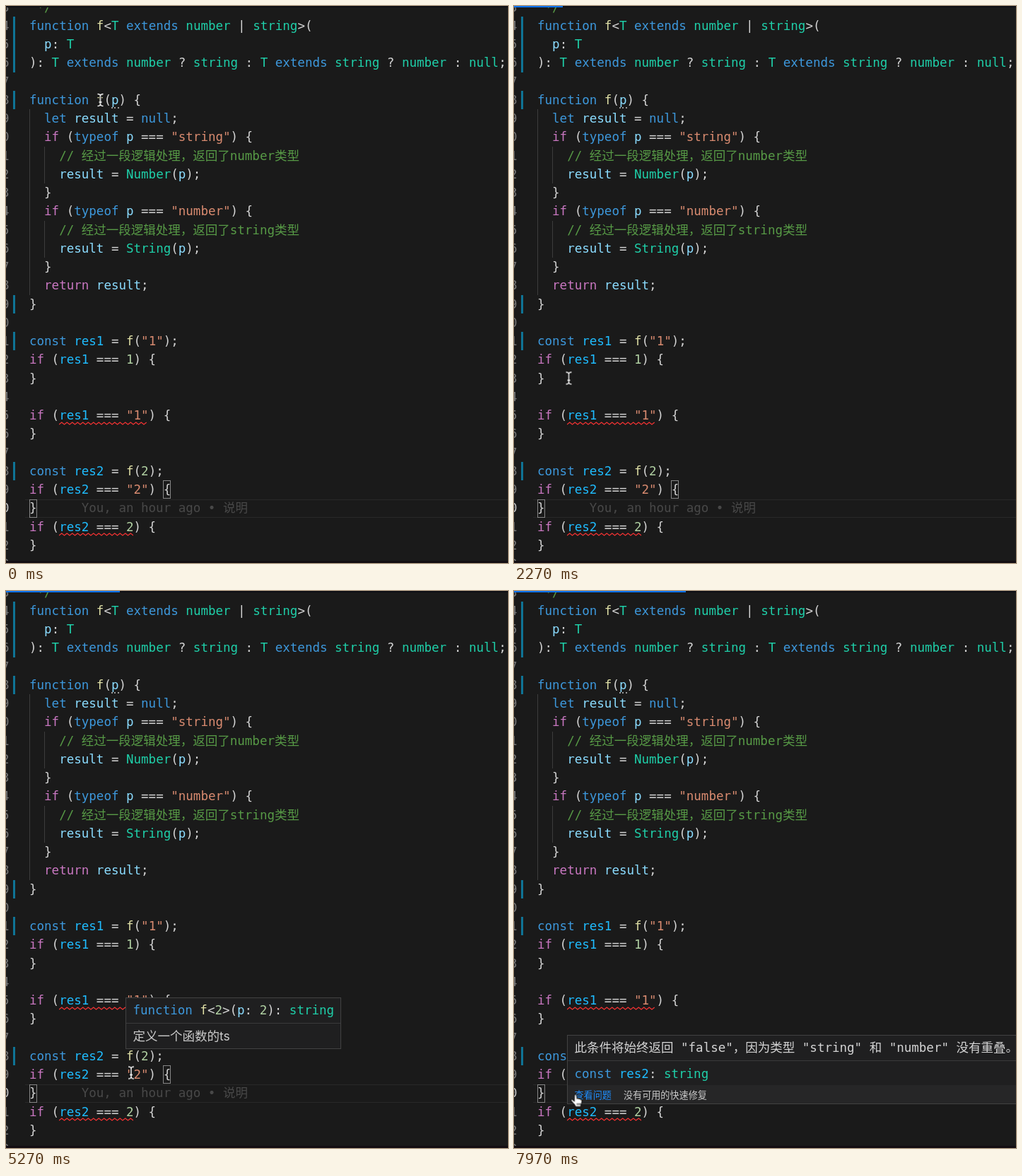
Write an HTML page that moves like this. It is 710x788 px and loops after 8 s.

```html
<!DOCTYPE html>
<html lang="zh-CN">
<head>
<meta charset="utf-8">
<title>Code editor</title>
<style>
  html, body { margin: 0; width: 100%; height: 100%; overflow: hidden; background: #1a1a1a; }
  #stage {
    position: absolute; left: 0; top: 0; width: 710px; height: 788px; overflow: hidden;
    color: #d4d4d4; background: #1a1a1a;
    font: 17.5px/26.25px "DejaVu Sans Mono", "Noto Sans CJK SC", monospace;
    font-variant-ligatures: none;
  }
  #stage div, #stage svg { position: absolute; box-sizing: border-box; }
  .row { white-space: pre; height: 26.25px; }
  .digit { color: #777; }
  .digit.active { color: #c6c6c6; }
  .changed { left: 10px; width: 3px; background: #0f7496; }
  .guide { width: 1px; background: #3c3c3c; }
  .current { left: 27px; right: 0; top: 698px; height: 26px; border: solid #282828; border-width: 1px 0; }
  .blame { color: #484848; }
  .bracket { width: 11px; height: 26px; border: 1px solid #868686; }
  .dots { left: 149px; top: 143px; width: 11px; height: 2px;
    background: repeating-linear-gradient(90deg, #999 0 2px, transparent 2px 4.4px); }

  .comment { color: #579a46; }
  .string { color: #d98b70; }
  .keyword { color: #3d98dc; }
  .control { color: #c977c1; }
  .constant { color: #1fbcff; }
  .type { color: #1fcfa9; }
  .call { color: #dfdfa6; }
  .variable { color: #8bdcff; }
  .number { color: #b1d1a3; }

  .tip { background: #1f1f20; border: 1px solid #424242; opacity: 0; }
  .rule { left: 0; right: 0; height: 1px; background: #3a3a3b; }
  .doc { font-family: Inter, "Noto Sans CJK SC", sans-serif; color: #cacaca; }
  .status { left: 0; right: 0; top: 70px; bottom: 0; background: #262627; }
  .small { font: 13.1px/26.25px "Noto Sans CJK SC", sans-serif; color: #cacaca; }
  .link { color: #1f8fff; }

  .top, .progress { left: 0; top: 0; height: 2px; }
  .top { width: 710px; background: #0d0e14; }
  .progress { background: #0b70ea; animation: grow 8s linear infinite; }
  .bottom { left: 0; bottom: 0; width: 710px; height: 3px; background: #130d12; }
  .caret { left: 43px; top: 699px; width: 2px; height: 25px; background: #b4b4b4;
    animation: blink 1s step-end infinite; }
  #mouse { left: 0; top: 0; animation: travel 8s ease-in-out infinite; }
  #mouse svg { left: -14px; top: -14px; }
  .beam { animation: beam 8s step-end infinite; }
  .hand { animation: hand 8s step-end infinite; }
  #tip1 { left: 128px; top: 23px; width: 600px; height: 100px; animation: tip1 8s linear infinite; }
  #tip2 { left: 169px; top: 575px; width: 305px; height: 73px; animation: tip2 8s linear infinite; }
  #tip3 { left: 75px; top: 628px; width: 660px; height: 98px; animation: tip3 8s linear infinite; }

  @keyframes grow { from { width: 0; } to { width: 244px; } }
  @keyframes blink { 0%, 82% { opacity: 0; } 32% { opacity: 1; } }
  @keyframes tip1 { 0%, 10.2% { opacity: 0; } 11.3%, 18% { opacity: 1; } 18.01%, 100% { opacity: 0; } }
  @keyframes tip2 { 0%, 53.5% { opacity: 0; } 54.7%, 67.2% { opacity: 1; } 67.21%, 100% { opacity: 0; } }
  @keyframes tip3 { 0%, 77.2% { opacity: 0; } 78.4%, 100% { opacity: 1; } }
  @keyframes beam { 0% { opacity: 1; } 90.5%, 100% { opacity: 0; } }
  @keyframes hand { 0% { opacity: 0; } 90.5%, 100% { opacity: 1; } }
  @keyframes travel {
    0%, 16.5% { transform: translate(133.5px, 133px); }
    26%, 31% { transform: translate(77.5px, 526.5px); }
    41%, 45% { transform: translate(159.5px, 656px); }
    48.5%, 61% { transform: translate(175px, 659px); }
    65.9% { transform: translate(177px, 681.5px); }
    73%, 86% { transform: translate(106.5px, 735px); }
    93%, 100% { transform: translate(88.5px, 720.5px); }
  }
</style>
</head>
<body>
<div id="stage"></div>
<script>
const LEFT = 33, CHAR = 10.535, LINE = 26.25;
const stage = document.getElementById('stage');

const code = ` */
function f<T extends number | string>(
  p: T
): T extends number ? string : T extends string ? number : null;

function f(p) {
  let result = null;
  if (typeof p === "string") {
    // 经过一段逻辑处理，返回了number类型
    result = Number(p);
  }
  if (typeof p === "number") {
    // 经过一段逻辑处理，返回了string类型
    result = String(p);
  }
  return result;
}

const res1 = f("1");
if (res1 === 1) {
}

if (res1 === "1") {
}

const res2 = f(2);
if (res2 === "2") {
}
if (res2 === 2) {
}
`.split('\n');

const tokens = new RegExp([
  '(?<comment>//.*|\\*/)',
  '(?<string>"[^"]*")',
  '(?<type>(?<=: )null|\\b(?:T|string|number|String|Number)\\b)',
  '(?<keyword>\\b(?:function|let|const|typeof|extends|null)\\b)',
  '(?<control>\\b(?:if|return)\\b)',
  '(?<constant>\\bres\\d)',
  '(?<call>\\bf\\b)',
  '(?<variable>\\b(?:p|result)\\b)',
  '(?<number>\\b\\d\\b)'
].join('|'), 'g');

const escapeHtml = s => s.replace(/&/g, '&amp;').replace(/</g, '&lt;');

function highlight(text) {
  let html = '', end = 0;
  for (const m of text.matchAll(tokens)) {
    const kind = Object.keys(m.groups).find(k => m.groups[k]);
    html += escapeHtml(text.slice(end, m.index)) + `<span class="${kind}">${escapeHtml(m[0])}</span>`;
    end = m.index + m[0].length;
  }
  return html + escapeHtml(text.slice(end));
}

function add(parent, className, style = {}, html = '') {
  const el = document.createElement('div');
  el.className = className;
  for (const key in style) el.style[key] = style[key] + 'px';
  el.innerHTML = html;
  parent.append(el);
  return el;
}

// Places a row of text by the middle of its line.
const row = (parent, x, middle, html, kind = '') =>
  add(parent, 'row ' + kind, { left: x, top: middle - LINE / 2 }, html);

const middleOf = i => 1.75 + i * LINE;
const topOf = i => middleOf(i) - LINE / 2;

function squiggle(i, columns) {
  const width = columns * CHAR, step = 3.75;
  let path = 'M0 4';
  for (let n = 1; n * step <= width; n++) path += `L${n * step} ${n % 2 ? 1 : 4}`;
  add(stage, '', { left: LEFT + 4 * CHAR, top: topOf(i) + LINE - 4.5 },
    `<svg width="${width}" height="5"><path d="${path}" fill="none" stroke="#f23232" stroke-width="1.3"/></svg>`);
}

add(stage, 'current');
for (const [first, count] of [[1, 3], [5, 1], [16, 1], [18, 1], [25, 1]])
  add(stage, 'changed', { top: topOf(first), height: count * LINE });
for (const [column, first, count] of [[0, 6, 10], [2, 8, 2], [2, 13, 2]].map(g => g[1] === 13 ? [2, 12, 2] : g))
  add(stage, 'guide', { left: LEFT + column * CHAR, top: topOf(first), height: count * LINE });

code.forEach((text, i) => {
  row(stage, -6, middleOf(i), (i + 3) % 10, i === 27 ? 'digit active' : 'digit');
  row(stage, LEFT, middleOf(i), highlight(text));
});
row(stage, LEFT + 7 * CHAR, middleOf(27), 'You, an hour ago • 说明', 'blame');
add(stage, 'dots');
squiggle(22, 12);
squiggle(28, 10);
add(stage, 'bracket', { left: 222, top: 671 });
add(stage, 'bracket', { left: 33, top: 698 });
add(stage, 'caret');

function tip(id) {
  const el = add(stage, 'tip');
  el.id = id;
  return el;
}

const signature = tip('tip1');
row(signature, 9, 17, highlight('function f<T extends string | number>(p: T): T extends'));
row(signature, 9, 43.25, highlight('extends string ? number : null'));
add(signature, 'rule', { top: 62 });
row(signature, 9, 80, '定义一个函数的ts', 'doc');

const callTip = tip('tip2');
row(callTip, 9.5, 17, highlight('function f<2>(p: 2): string'));
add(callTip, 'rule', { top: 35 });
row(callTip, 9.5, 54, '定义一个函数的ts', 'doc');

const problem = tip('tip3');
row(problem, 9.5, 17.5, '此条件将始终返回 "false"，因为类型 "string" 和 "number" 没有重叠。');
add(problem, 'rule', { top: 35 });
row(problem, 9.5, 54, highlight('const res2: string'));
add(problem, 'status');
row(problem, 9.5, 84.5, '查看问题', 'small link');
row(problem, 79, 84.5, '没有可用的快速修复', 'small');

add(stage, 'top');
add(stage, 'progress');
add(stage, 'bottom');

const beam = 'M-4 -8.5Q0 -8.5 0 -5.5Q0 -8.5 4 -8.5M0 -6V6M-4 8.5Q0 8.5 0 5.5Q0 8.5 4 8.5M-2 3H2';
const hand = 'M-3 -7.5C-2 -9 0 -8.5 0 -7L.7 -2.5C1.5 -3.7 3 -3 3.2 -2C4 -2.8 5.4 -2 5.6 -1' +
  'C7 -1.5 7.8 -.3 7.7 1L7 5Q6.2 6.5 5.8 9H-1.5Q-2.5 6 -5.5 3.5L-8 .5C-8.3 -1.5 -6 -1.8 -4.8 -.3L-3.2 1L-3 -7.5Z';
const svg = (kind, body) => `<svg class="${kind}" width="28" height="28" viewBox="-14 -14 28 28">${body}</svg>`;
add(stage, '', {}, svg('beam',
  `<g fill="none"><path d="${beam}" stroke="#111" stroke-width="3.2"/><path d="${beam}" stroke="#fff" stroke-width="1.4"/></g>`) +
  svg('hand', `<path d="${hand}" fill="#fff" stroke="#111" stroke-width="1.2"/>
    <path d="M1 4V7M3.2 4V7M5.2 4V7" stroke="#111" stroke-width=".9"/>`)).id = 'mouse';
</script>
</body>
</html>
```
